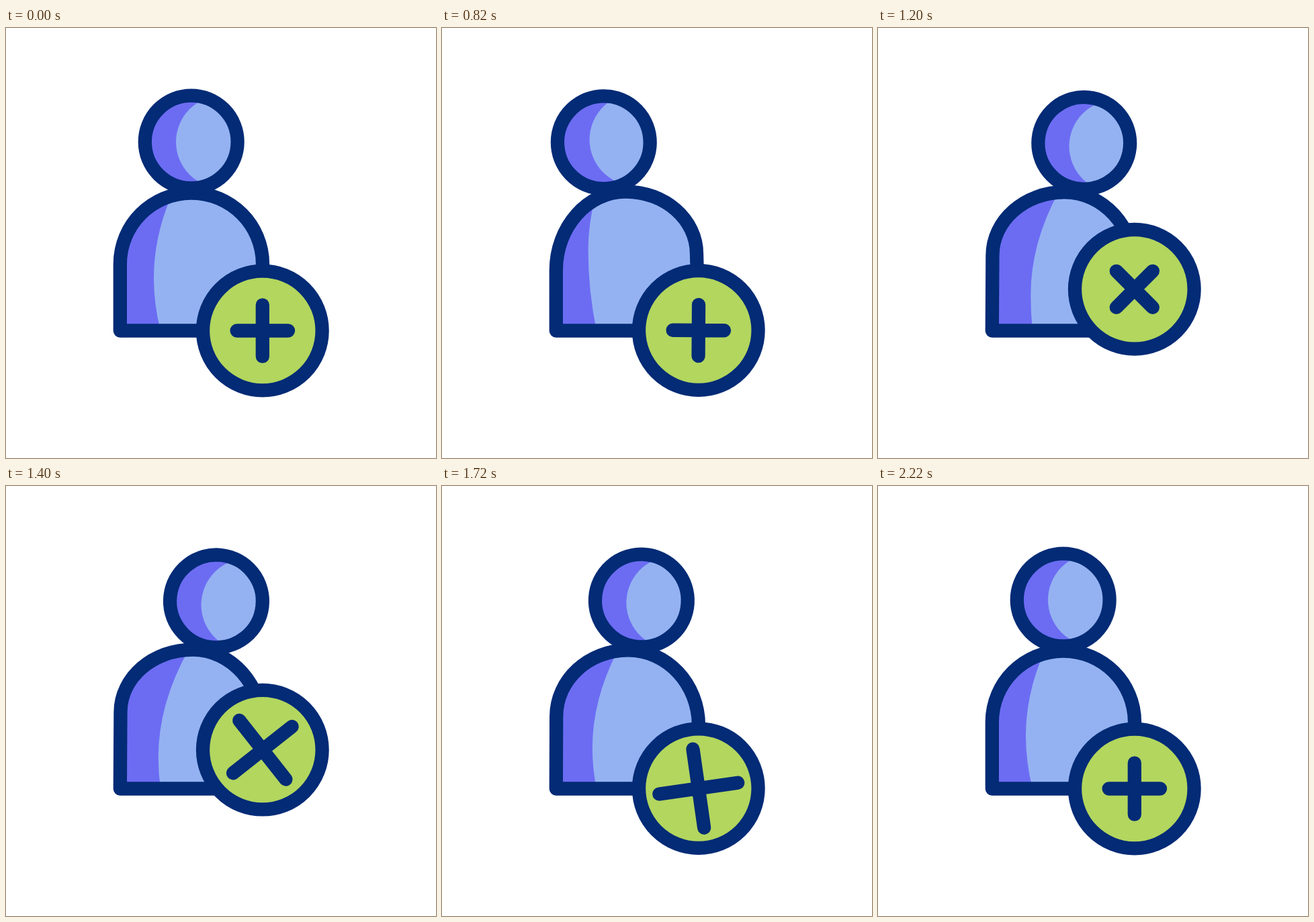
An HTML page with a canvas for the animation above (2.4 s loop, 640 by 640 pixels).

```html
<!DOCTYPE html>
<html lang="en">
<head>
<meta charset="utf-8">
<title>Add user</title>
<style>
  html, body { margin: 0; width: 100%; height: 100%; overflow: hidden; background: #fff; }
  canvas { display: block; width: 640px; height: 640px; }
</style>
</head>
<body>
<canvas id="stage" width="640" height="640"></canvas>
<script>
const LOOP = 2400;
const NAVY = '#032b76', PURPLE = '#6c6cf3', BLUE = '#94b2f1', GREEN = '#b2d65e';
const KAPPA = 0.5523;
const ctx = document.getElementById('stage').getContext('2d');

// head: centre, tilt, shade shift; body: left, top and right of the arch;
// shade: top and leftmost point of the body's shadow edge
const REST = {
  head: [275.7, 169.5, 0, 0],
  body: [169.8, 351.5, 276, 245.5, 382, 351.5],
  shade: [246, 250, 220, 372]
};
const LEFT = {
  head: [240.4, 170.2, -5, 1.7],
  body: [169.8, 361, 273.5, 243.5, 379, 336],
  shade: [228.3, 250, 217.5, 330]
};
const RIGHT = {
  head: [314.3, 171.5, 6.8, 0.6],
  body: [170.5, 336, 278, 243.5, 382, 361],
  shade: [273, 243, 227, 405]
};
const POSES = [[200, REST], [600, LEFT], [800, LEFT], [1300, RIGHT], [2200, REST]];
const LIFT = [[800, 0], [1200, 61.7], [1340, 61.7], [1740, 0]];
const SPIN = [[800, 0], [1200, 45], [1240, 45], [1900, 90]];
const ARM = [[1200, 38.2], [1560, 68.2], [2000, 38.2]];

const mix = (a, b, p) => a + (b - a) * p;
const rad = deg => deg * Math.PI / 180;

function ease(t, from, to) {
  const p = Math.min(1, Math.max(0, (t - from) / (to - from)));
  return p * p * (3 - 2 * p);
}

// Finds the two keys around t and blends them
function track(t, keys, blend = mix) {
  let i = 0;
  while (i < keys.length - 2 && t >= keys[i + 1][0]) i++;
  const [[t0, a], [t1, b]] = [keys[i], keys[i + 1]];
  return blend(a, b, ease(t, t0, t1));
}

function mixPose(a, b, p) {
  const pose = {};
  for (const part in a) pose[part] = a[part].map((v, i) => mix(v, b[part][i], p));
  return pose;
}

function disc(x, y, r) {
  const path = new Path2D();
  path.arc(x, y, r, 0, 2 * Math.PI);
  return path;
}

// Fills a shape, lays a second colour over part of it, then outlines it
function outlined(shape, base, overlay, color) {
  ctx.fillStyle = base;
  ctx.fill(shape);
  if (overlay) {
    ctx.save();
    ctx.clip(shape);
    ctx.fillStyle = color;
    ctx.fill(overlay);
    ctx.restore();
  }
  ctx.stroke(shape);
}

function drawBody([lx, ly, tx, ty, rx, ry], [ax, ay, mx, my], squeeze) {
  const bottom = 450.5;
  ty += 2 * squeeze;
  mx += 3.5 * squeeze;
  ax += 1.5 * squeeze;
  const arch = new Path2D();
  arch.moveTo(169.8, bottom);
  arch.lineTo(lx, ly);
  arch.bezierCurveTo(lx, mix(ly, ty, KAPPA), mix(tx, lx, KAPPA), ty, tx, ty);
  arch.bezierCurveTo(mix(tx, rx, KAPPA), ty, rx, mix(ry, ty, KAPPA), rx, ry);
  arch.lineTo(382, bottom);
  arch.closePath();

  const shadow = new Path2D();
  shadow.moveTo(100, ay);
  shadow.lineTo(ax, ay);
  shadow.quadraticCurveTo(mx, (ay + my) / 2, mx, my);
  shadow.quadraticCurveTo(mx, (my + bottom) / 2, 230, bottom);
  shadow.lineTo(100, bottom);
  outlined(arch, BLUE, shadow, PURPLE);
}

function drawHead([x, y, tilt, shift], squeeze) {
  ctx.save();
  ctx.translate(x, y);
  ctx.rotate(rad(tilt));
  outlined(disc(0, 0, 68.9 - 1.4 * squeeze), PURPLE, disc(46.2 + shift, 0, 68.9), BLUE);
  ctx.restore();
}

function drawBadge(t) {
  const arm = track(t, ARM);
  ctx.save();
  ctx.translate(381.8, 450.5 - track(t, LIFT));
  outlined(disc(0, 0, 88.8), GREEN);
  ctx.rotate(rad(track(t, SPIN)));
  ctx.stroke(new Path2D(`M${-arm} 0H${arm}M0 ${-arm}V${arm}`));
  ctx.restore();
}

function draw(now) {
  const t = now % LOOP;
  const pose = track(t, POSES, mixPose);
  const swing = ease(t, 800, 1300);
  const squeeze = 4 * swing * (1 - swing);
  ctx.fillStyle = '#fff';
  ctx.fillRect(0, 0, 640, 640);
  ctx.strokeStyle = NAVY;
  ctx.lineWidth = 20.3;
  ctx.lineCap = ctx.lineJoin = 'round';
  drawBody(pose.body, pose.shade, squeeze);
  drawHead(pose.head, squeeze);
  drawBadge(t);
}

const start = performance.now();
function frame() {
  draw(performance.now() - start);
  requestAnimationFrame(frame);
}
frame();
</script>
</body>
</html>
```
